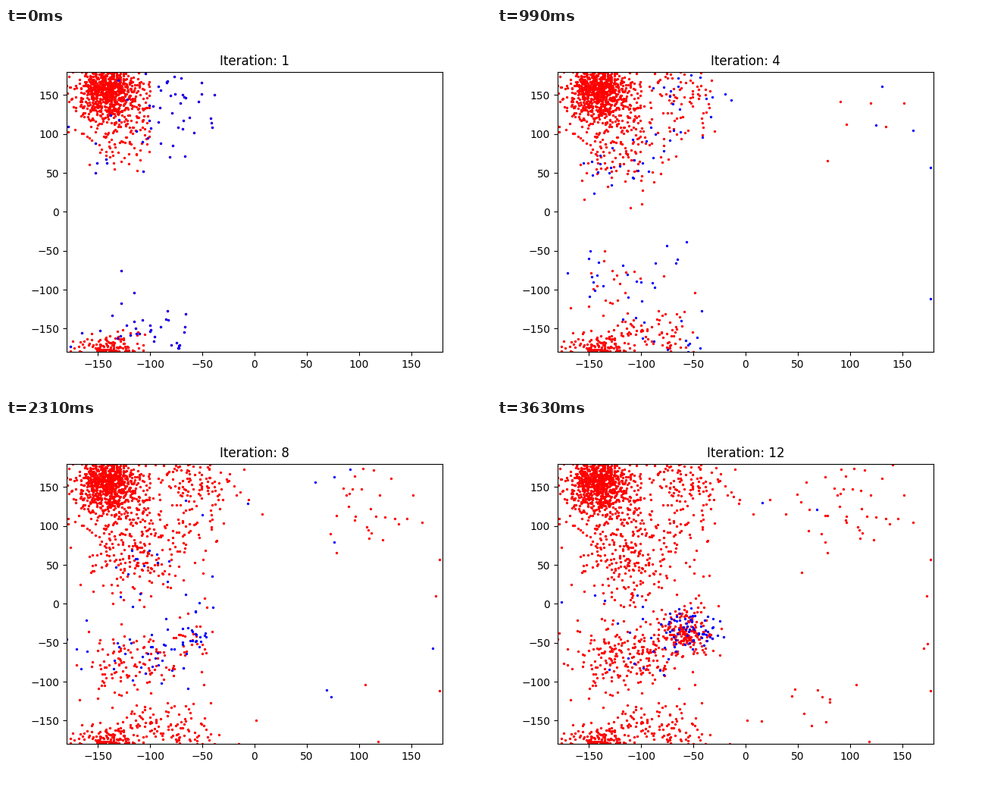
Recreate the animation shown at these times as a matplotlib script. Size 640 by 480 pixels, loop 3.96 s.

```python
import numpy as np
import matplotlib.pyplot as plt
from matplotlib.animation import FuncAnimation

STEPS = 12
INTERVAL = 330
BATCH = 85
CORE = np.array([-142, 157])
rng = np.random.default_rng(12)

# Basins of the map: centre x, y, spread x, y and weight
BASINS = np.array([
    (-60, 145, 25, 29, 0.20),
    (-100, -160, 30, 14, 0.16),
    (-112, -67, 28, 27, 0.25),
    (-108, 57, 28, 37, 0.25),
    (-56, -32, 14, 15, 0.40),
    (98, 125, 42, 28, 0.06),
    (55, -125, 25, 20, 0.012),
])


def wrap(points):
    return (points + 180) % 360 - 180


def start_cloud():
    """Dense core plus a wider halo, cut to the starting basin."""
    core = rng.normal(CORE, (15, 17), (680, 2))
    halo = rng.normal((-130, 135), (20, 32), (320, 2))
    pts = np.vstack([core, halo])
    x, y = pts.T
    inside = (x > -180) & (x < -100) & (y > 50) & (y < 210)
    return wrap(pts[inside])


def new_points(step):
    """Points of the map near a front that spreads from the core."""
    weight = BASINS[:, 4] / BASINS[:, 4].sum()
    basin = BASINS[rng.choice(len(BASINS), 8000, p=weight)]
    pts = wrap(rng.normal(basin[:, :2], basin[:, 2:4]))
    dist = np.hypot(*wrap(pts - CORE).T)
    front = 52 + 12 * step
    keep = rng.random(len(pts)) < np.exp(-0.5 * ((dist - front) / 28) ** 2)
    return pts[keep][:BATCH]


start = start_cloud()
fresh = [new_points(step) for step in range(1, STEPS + 1)]

fig, ax = plt.subplots(figsize=(6.4, 4.8), dpi=100)
ax.set_xlim(-180, 180)
ax.set_ylim(-180, 180)
ticks = range(-150, 151, 50)
ax.set_xticks(ticks)
ax.set_yticks(ticks)
title = ax.set_title("Iteration: 1")
old_dots = ax.scatter([], [], s=2, c="red")
new_dots = ax.scatter([], [], s=2, c="blue")


def update(i):
    # The first batch also belongs to the red set below it.
    seen = fresh[:max(i, 1)]
    old_dots.set_offsets(np.vstack([start, *seen]))
    new_dots.set_offsets(fresh[i])
    title.set_text(f"Iteration: {i + 1}")
    return old_dots, new_dots, title


anim = FuncAnimation(fig, update, frames=STEPS, interval=INTERVAL,
                     repeat=True, repeat_delay=0)
plt.show()
```
